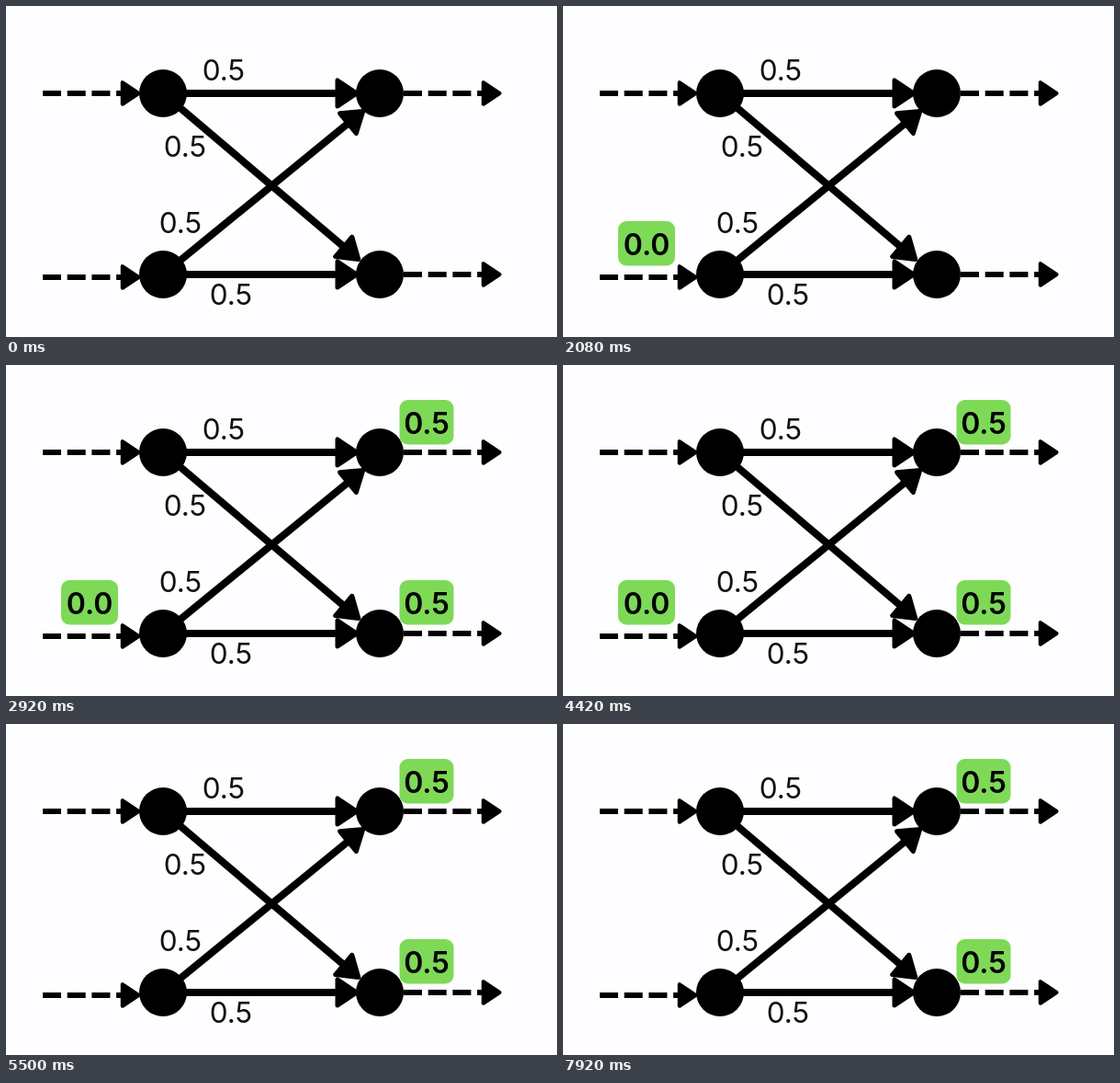
An HTML page for the animation above (8 s loop, 600x360 px).

```html
<!DOCTYPE html>
<html lang="en">
<head>
<meta charset="utf-8">
<title>Network flow</title>
<style>
  html, body { margin: 0; width: 100%; height: 100%; overflow: hidden; background: #fefdff; }
  svg { display: block; width: 600px; height: 360px; }
  text { font-family: Inter, "Open Sans", sans-serif; font-size: 31.5px; text-anchor: middle; }
  .weight { fill: #111; }
  .tile text { font-size: 32px; font-weight: 600; }
  .tile rect { fill: #7ed957; }
</style>
</head>
<body>
<svg id="stage" viewBox="0 0 600 360"></svg>
<script>
const LOOP = 8000, FPS = 12;
const SLIDE_MS = 530, SLIDE_PX = 47;
const stage = document.getElementById('stage');

function add(parent, tag, attrs, text) {
  const node = document.createElementNS('http://www.w3.org/2000/svg', tag);
  for (const key in attrs) node.setAttribute(key, attrs[key]);
  if (text) node.textContent = text;
  return parent.appendChild(node);
}

// Draws an arrow of the given length; its rounded tip ends at the far end.
function arrow(x, y, length, angle, width, headScale, dash = 'none') {
  const g = add(stage, 'g', { transform: `translate(${x} ${y}) rotate(${angle})`, stroke: '#000' });
  add(g, 'path', { d: `M0 0H${length - 22 * headScale}`, 'stroke-width': width, 'stroke-dasharray': dash });
  add(g, 'path', {
    d: 'M-24-14V14L-3 0Z', 'stroke-width': 5, 'stroke-linejoin': 'round',
    transform: `translate(${length} 0) scale(${headScale})`
  });
}

function dashedArrow(x, y, length) {
  arrow(x, y, length, 0, 6, 0.84, '20 6.7');
}

function tile(label, cx, cy, width) {
  const g = add(stage, 'g', { class: 'tile' });
  add(g, 'rect', { x: -width / 2, y: -24, width, height: 48.5, rx: 9 });
  add(g, 'text', { y: 12.5 }, label);
  if (label[0] === '1') add(g, 'rect', { x: -24, y: 9, width: 16, height: 3.5, style: 'fill:#000' });

  return ({ dx = 0, scale = 1, opacity = 1 }) => {
    g.setAttribute('transform', `translate(${cx + dx} ${cy}) scale(${scale})`);
    g.setAttribute('opacity', opacity);
  };
}

dashedArrow(40, 95, 107);
dashedArrow(40, 295, 107);
dashedArrow(433, 95, 107);
dashedArrow(433, 292, 107);
arrow(171, 95, 214, 0, 8, 1);
arrow(171, 292, 214, 0, 8, 1);
arrow(171, 95, 282, 40.3, 8, 1);
arrow(171, 292, 284, -39.2, 8, 1);
for (const cx of [171, 407])
  for (const cy of [95, 292]) add(stage, 'circle', { cx, cy, r: 26 });
for (const [x, y] of [[237, 81], [195, 164], [190, 247], [245, 325]])
  add(stage, 'text', { class: 'weight', x, y }, '0.5');

const inputTop = tile('1.0', 91, 62, 56);
const inputBottom = tile('0.0', 91, 258, 62);
const outputTop = tile('0.5', 458, 62, 59);
const outputBottom = tile('0.5', 458, 258, 59);

const HIDDEN = { opacity: 0 };
const progress = (t, start) => Math.min(1, Math.max(0, (t - start) / SLIDE_MS));

function slideIn(t, start) {
  const rest = (1 - progress(t, start)) ** 3;
  return { dx: -SLIDE_PX * rest, opacity: 1 - rest };
}

function slideOut(t, start) {
  const gone = progress(t, start) ** 3;
  return { dx: SLIDE_PX * gone, opacity: 1 - gone };
}

// Springs up from nothing, overshoots a little and settles.
function pop(t, start) {
  const age = t - start;
  if (age < 0) return HIDDEN;
  return { scale: 1 - Math.exp(-0.014 * age) * Math.cos(Math.PI * age / 158) };
}

function output(t, delay) {
  return t < 6080 ? slideIn(t, 2119 + delay) : pop(t, 6096 + delay);
}

function draw(now) {
  const t = Math.floor((now % LOOP + 4) * FPS / 1000) * 1000 / FPS;
  inputTop(t < 2080 ? slideIn(t, 535) : HIDDEN);
  inputBottom(t < 4900 ? slideIn(t, 702) : slideOut(t, 4923));
  outputTop(output(t, 0));
  outputBottom(output(t, 167));
}

const began = performance.now();
function tick() {
  draw(performance.now() - began);
  requestAnimationFrame(tick);
}
tick();
</script>
</body>
</html>
```
